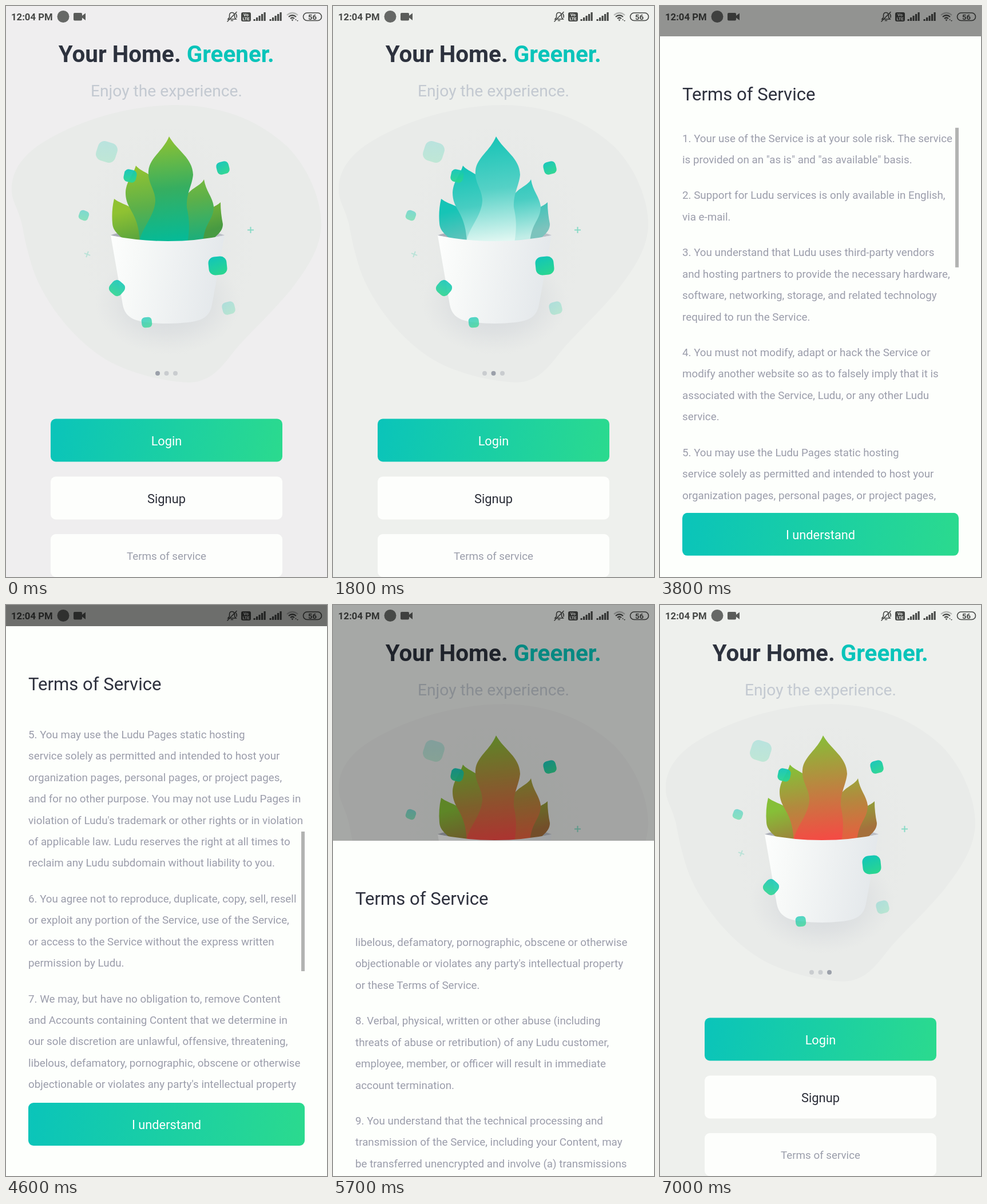
Animation, 561 px wide and 998 px high, one loop 7.1 s. Source, as an HTML page:

```html
<!DOCTYPE html>
<html lang="en">
<head>
<meta charset="utf-8">
<title>Plant shop onboarding</title>
<style>
  html, body { margin: 0; width: 100%; height: 100%; overflow: hidden; background: #eef0ed; }
  #stage { position: absolute; left: 0; top: 0; width: 561px; height: 998px; overflow: hidden;
    font-family: Roboto, "Open Sans", sans-serif; animation: tint 7.1s linear infinite; }
  #stage > svg { position: absolute; left: 0; top: 0; display: block; }
  text { text-anchor: middle; }

  .strip { animation: swipe 7.1s linear infinite; }
  .dot { fill: #9ba0aa; animation: 7.1s linear infinite; }
  .dot.a { animation-name: dotA; }
  .dot.b { animation-name: dotB; }
  .dot.c { animation-name: dotC; }
  .terms { animation: pressTerms 7.1s linear infinite; }

  .dim { position: absolute; inset: 0; background: #000; opacity: 0; animation: dim 7.1s linear infinite; }
  .modal { position: absolute; left: 0; top: 37px; width: 561px; height: 961px; background: #fdfffc;
    transform: translateY(962px); animation: sheet 7.1s linear infinite; }
  h2 { position: absolute; left: 39px; top: 82.5px; margin: 0; font: 400 31.1px/37px Roboto, "Open Sans", sans-serif;
    color: #2d303d; white-space: nowrap; }
  .view { position: absolute; left: 0; top: 159.5px; width: 561px; height: 664px; overflow: hidden; }
  .copy { padding: 1px 0 0 39px; font-size: 18.8px; line-height: 37.44px; color: #9b9dab; white-space: pre;
    animation: scroll 7.1s linear infinite; }
  .copy p { margin: 0 0 25px; }
  .bar { position: absolute; left: 516px; top: 0; width: 6px; height: 244px; background: #b2b3b2;
    animation: bar 7.1s linear infinite, barFade 7.1s linear infinite; }
  .ok { position: absolute; left: 39px; top: 833px; width: 483px; height: 75px; border-radius: 9px;
    background: linear-gradient(98.8deg, #0ac4ba, #2bda8e); color: #fff; font-size: 21.8px; line-height: 77px;
    text-align: center; animation: pressOk 7.1s linear infinite; }

  @keyframes tint { 0%, 7.04% { background: #efeeef } 7.05%, 100% { background: #eef0ed } }
  @keyframes swipe {
    0%, 19.014% { transform: translateX(0); animation-timing-function: cubic-bezier(.3, .2, .2, 1) }
    24.648% { transform: translateX(-561px) }
    33.099% { transform: translateX(-561px); animation-timing-function: cubic-bezier(.3, .2, .2, 1) }
    38.732%, 100% { transform: translateX(-1122px) }
  }
  @keyframes dotA { 0%, 19% { opacity: 1 } 23%, 100% { opacity: .4 } }
  @keyframes dotB { 0%, 19% { opacity: .4 } 23%, 33.1% { opacity: 1 } 37%, 100% { opacity: .4 } }
  @keyframes dotC { 0%, 33.1% { opacity: .4 } 37%, 100% { opacity: 1 } }
  @keyframes pressTerms { 0%, 48.5% { opacity: 1 } 49.2%, 50.8% { opacity: .8 } 54%, 100% { opacity: 1 } }
  @keyframes dim { 0%, 50.845% { opacity: 0 } 54.55%, 77.465% { opacity: .54 } 83.803%, 100% { opacity: 0 } }
  @keyframes sheet {
    0%, 50.845% { transform: translateY(961px); animation-timing-function: cubic-bezier(.333, .667, .667, 1) }
    53.915% { transform: none }
    77.408% { transform: none; animation-timing-function: cubic-bezier(.333, 0, .667, .333) }
    82.009%, 100% { transform: translateY(961px) }
  }
  @keyframes scroll {
    0%, 57.042% { transform: none; animation-timing-function: ease-out }
    64.085% { transform: translateY(-538px) }
    65.493% { transform: translateY(-538px); animation-timing-function: ease-out }
    72.535%, 100% { transform: translateY(-1124px) }
  }
  @keyframes bar {
    0%, 57.042% { transform: none; animation-timing-function: ease-out }
    64.085% { transform: translateY(199px) }
    65.493% { transform: translateY(199px); animation-timing-function: ease-out }
    72.535%, 100% { transform: translateY(416px) }
  }
  @keyframes barFade { 0%, 76.76% { opacity: 1 } 79.577%, 100% { opacity: 0 } }
  @keyframes pressOk { 0%, 72.5% { opacity: 1 } 73.2%, 77% { opacity: .8 } 80%, 100% { opacity: 1 } }
</style>
</head>
<body>
<div id="stage">
  <svg width="561" height="998" viewBox="0 0 561 998">
    <defs>
      <linearGradient id="cta" gradientUnits="userSpaceOnUse" x1="78" y1="721.5" x2="483" y2="796.5">
        <stop stop-color="#0ac4ba"/><stop offset="1" stop-color="#2bda8e"/>
      </linearGradient>
      <linearGradient id="chip" x1=".35" y1="0" x2=".65" y2="1">
        <stop stop-color="#12c6b7"/><stop offset="1" stop-color="#2ad690"/>
      </linearGradient>
      <linearGradient id="pot" x1="0" y1="0" x2="1" y2=".12">
        <stop stop-color="#fdfefd"/><stop offset=".25" stop-color="#f7f9f8"/><stop offset="1" stop-color="#e4e8eb"/>
      </linearGradient>
      <linearGradient id="rim">
        <stop stop-color="#aeb1bb"/><stop offset=".5" stop-color="#8f939e"/><stop offset="1" stop-color="#c0c3cb"/>
      </linearGradient>
      <radialGradient id="halo">
        <stop stop-color="#c4c9d1" stop-opacity=".6"/><stop offset=".6" stop-color="#ccd0d6" stop-opacity=".32"/>
        <stop offset="1" stop-color="#d5d8dc" stop-opacity="0"/>
      </radialGradient>
    </defs>

    <g class="strip" id="strip"></g>

    <text x="280.3" y="98" font-size="40.4" font-weight="700" fill="#2d323e">Your Home. <tspan fill="#0ac4ba">Greener.</tspan></text>
    <text x="280.5" y="158.3" font-size="28.2" fill="#c3c9d1">Enjoy the experience.</text>

    <circle class="dot a" cx="265" cy="642" r="4"/>
    <circle class="dot b" cx="280.5" cy="642" r="4"/>
    <circle class="dot c" cx="296" cy="642" r="4"/>

    <rect x="78" y="721.5" width="405" height="75" rx="9" fill="url(#cta)"/>
    <text x="280.5" y="767.8" font-size="21.8" fill="#fff">Login</text>
    <rect x="78" y="822.5" width="405" height="75" rx="9" fill="#fdfefc"/>
    <text x="280.5" y="868.5" font-size="21.8" fill="#2b2e38">Signup</text>
    <g class="terms">
      <rect x="78" y="923" width="405" height="75" rx="9" fill="#fdfefc"/>
      <text x="280.5" y="968.3" font-size="18.8" fill="#9b9eab">Terms of service</text>
    </g>

    <g id="status" fill="#464846">
      <text x="45.3" y="24.8" font-size="16.7" font-weight="700">12:04 PM</text>
      <circle cx="100" cy="18.5" r="10.5" fill="#666866"/>
      <path d="M120 12H131Q133 12 133 14V17L139 12.5V25L133 20.5V23.5Q133 25.5 131 25.5H120Q118 25.5 118 23.5V14Q118 12 120 12Z" fill="#5a5c5a"/>
      <g fill="none" stroke="#464846" stroke-width="1.6" stroke-linecap="round">
        <path d="M388 23H402L399.5 20V16.5Q399 11.5 395 11.5Q390.5 11.5 390.5 16.5V20ZM393.5 25.5H396.5M387 27L403 10.5M402 14Q404 17 403 20"/>
        <rect x="519.5" y="12" width="32" height="13.5" rx="6.75"/>
      </g>
      <rect x="411" y="11" width="17" height="16" rx="3"/>
      <g font-weight="700" font-size="7.5" fill="#eef0ed">
        <text x="419.5" y="18.3">Vo</text><text x="419.5" y="25.3">LTE</text>
      </g>
      <g id="bars"></g>
      <g fill="none" stroke-width="2.2">
        <path d="M491 16Q500.5 8 510 16" stroke="#b5b7b5"/>
        <path d="M494 19Q500.5 13.5 507 19M497 22Q500.5 19 504 22" stroke="#464846"/>
      </g>
      <path d="M498.5 23.5H502.5L500.5 26.5ZM505 24.5L506.5 22.5 508 24.5ZM508 25L509.5 27 511 25Z"/>
      <text x="535.5" y="23.5" font-size="13" font-weight="700">56</text>
    </g>
  </svg>

  <div class="dim"></div>

  <div class="modal">
    <h2>Terms of Service</h2>
    <div class="view">
      <div class="copy"><p>1. Your use of the Service is at your sole risk. The service
is provided on an "as is" and "as available" basis.</p><p>2. Support for Ludu services is only available in English,
via e-mail.</p><p>3. You understand that Ludu uses third-party vendors
and hosting partners to provide the necessary hardware,
software, networking, storage, and related technology
required to run the Service.</p><p>4. You must not modify, adapt or hack the Service or
modify another website so as to falsely imply that it is
associated with the Service, Ludu, or any other Ludu
service.</p><p>5. You may use the Ludu Pages static hosting
service solely as permitted and intended to host your
organization pages, personal pages, or project pages,
and for no other purpose. You may not use Ludu Pages in
violation of Ludu's trademark or other rights or in violation
of applicable law. Ludu reserves the right at all times to
reclaim any Ludu subdomain without liability to you.</p><p>6. You agree not to reproduce, duplicate, copy, sell, resell
or exploit any portion of the Service, use of the Service,
or access to the Service without the express written
permission by Ludu.</p><p>7. We may, but have no obligation to, remove Content
and Accounts containing Content that we determine in
our sole discretion are unlawful, offensive, threatening,
libelous, defamatory, pornographic, obscene or otherwise
objectionable or violates any party's intellectual property
or these Terms of Service.</p><p>8. Verbal, physical, written or other abuse (including
threats of abuse or retribution) of any Ludu customer,
employee, member, or officer will result in immediate
account termination.</p><p>9. You understand that the technical processing and
transmission of the Service, including your Content, may
be transferred unencrypted and involve (a) transmissions
over various networks; and (b) changes to conform and
adapt to technical requirements of connecting networks
or devices.</p><p>10. You must not transmit worms or viruses or any code
of a destructive nature.</p></div>
      <div class="bar"></div>
    </div>
    <div class="ok">I understand</div>
  </div>
</div>

<script>
  const LOOP = 7100, STEP = 100, WIDTH = 561;

  // Leaf colours per page: core top / middle / bottom, side middle / bottom, outer bottom
  const palettes = [
    ['#90c232', '#36ae60', '#05ba97', '#5cb04a', '#1fae78', '#479a42'],
    ['#16c4b6', '#55d1c6', '#e0f7f2', '#48cdc2', '#c2ede7', '#7cc3bd'],
    ['#86bf38', '#bd8340', '#f54a44', '#b28a3e', '#e2623f', '#a5703c']
  ];

  // x, y, size, rotation, opacity
  const chips = [
    [176, 255, 35, 18, .22], [217, 297, 22, 12, .95], [379, 283, 22, -14, .95], [136, 366, 17, 20, .5],
    [370, 454, 32, -6, 1], [194, 493, 25, 40, .88], [246, 553, 18, -6, .72], [389, 528, 22, -14, .25]
  ];

  const blob = 'M10 322C9 290 28 262 62 240C125 200 215 173 300 173C390 175 448 206 492 246' +
    'C530 285 551 340 551 382C550 425 525 460 497 497C465 535 435 563 412 588C385 616 368 658 318 658' +
    'C275 656 215 642 175 618C120 585 68 520 47 460C33 415 31 395 27 378C20 352 10 340 10 322Z';
  const leaves = {
    outer: 'M189 337C206 350 224 346 230 372Q236 392 237 414H210C203 402 187 397 186 380Q184 358 189 337Z' +
      'M375 343C366 352 352 351 346 373Q339 392 338 414H357C364 402 379 397 379 381Q375 362 375 343Z',
    side: 'M227 279C237 291 252 290 266 311L275 414H234C232 358 209 358 209 326C210 306 222 296 227 279Z' +
      'M346 303C340 316 318 318 310 342L310 414H344C347 377 363 375 363 350C361 334 349 323 346 303Z',
    core: 'M285 228C299 253 326 265 327 295C325 315 315 327 316 352C321 374 321 390 317 414H233' +
      'C235 390 260 368 261 340C261 321 247 309 249 288C251 265 275 253 285 228Z'
  };

  const gradient = (id, y, ...colors) =>
    `<linearGradient id="${id}" gradientUnits="userSpaceOnUse" x1="270" y1="${y}" x2="290" y2="411">` +
    colors.map((c, i) => `<stop offset="${i / (colors.length - 1)}" stop-color="${c}"/>`).join('') +
    '</linearGradient>';

  const chip = ([x, y, s, turn, alpha]) =>
    `<rect x="${-s / 2}" y="${-s / 2}" width="${s}" height="${s}" rx="${s * .34}" fill="url(#chip)"
      opacity="${alpha}" transform="translate(${x} ${y}) rotate(${turn})"/>`;

  const plus = (x, y, turn, alpha) =>
    `<path d="M-5.5 0H5.5M0 -5.5V5.5" stroke="#2ccaa4" stroke-width="2" opacity="${alpha}"
      transform="translate(${x} ${y}) rotate(${turn})"/>`;

  const page = ([top, mid, low, sideMid, sideLow, outer], i) => `
    <g transform="translate(${i * WIDTH})">
      ${gradient('core' + i, 228, top, mid, low)}
      ${gradient('side' + i, 280, top, sideMid, sideLow)}
      ${gradient('outer' + i, 340, top, outer)}
      <path d="${blob}" fill="#e9ebe9"/>
      <ellipse cx="283" cy="410" rx="155" ry="205" fill="url(#halo)" opacity=".2"/>
      <ellipse cx="283" cy="520" rx="128" ry="88" fill="url(#halo)"/>
      <path d="M183 401Q195 393 283 393T382 401Q283 421 183 401Z" fill="url(#rim)"/>
      ${['outer', 'side', 'core'].map(k => `<path d="${leaves[k]}" fill="url(#${k + i})"/>`).join('')}
      <path d="M183 401Q283 421 382 401L360 522C356 544 342 550 318 553Q283 557 247 553C222 550 208 543 204 522Z" fill="url(#pot)"/>
      ${chips.map(chip).join('')}
      ${plus(427.5, 391.5, 0, .5)}${plus(142, 434, 20, .25)}
    </g>`;

  document.getElementById('strip').innerHTML = palettes.map(page).join('');

  document.getElementById('bars').innerHTML = [432.5, 460.5].map(x =>
    [0, 1, 2, 3, 4].map(i =>
      `<rect x="${x + i * 4.5}" y="${23 - i * 3}" width="3.2" height="${3 + i * 3}"/>`).join('')).join('');

  // The screen refreshes ten times a second, so the CSS timelines advance in steps.
  const timelines = document.getAnimations();
  timelines.forEach(a => a.pause());
  const start = performance.now();
  function tick() {
    const time = (performance.now() - start + 16) % LOOP;
    const now = Math.floor(time / STEP) * STEP;
    timelines.forEach(a => { a.currentTime = now; });
    requestAnimationFrame(tick);
  }
  tick();
</script>
</body>
</html>
```
